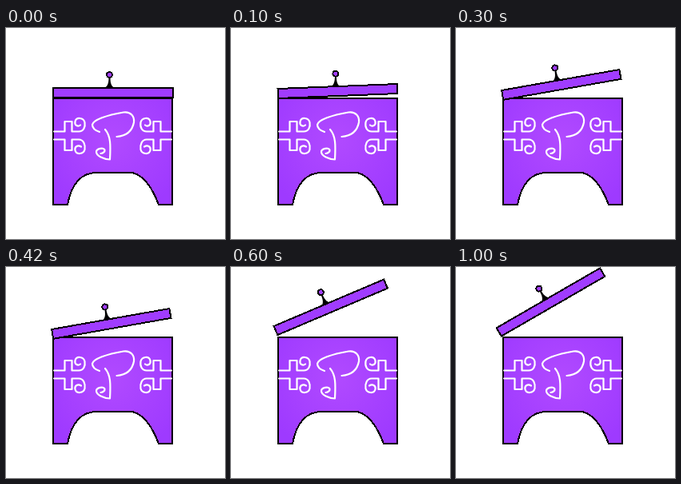
These frames come from a looping animation (274 by 264 pixels, 1200 ms). An HTML page:

```html
<!DOCTYPE html>
<html lang="en">
<head>
<meta charset="utf-8">
<title>Opening chest</title>
<style>
  html, body { margin: 0; width: 100%; height: 100%; overflow: hidden; background: #fff; }
  svg { display: block; width: 274px; height: 264px; }
  .box { fill: #a03cff; stroke: #000; stroke-width: 2; shape-rendering: crispEdges; }
  .trim { fill: none; stroke: #fff; stroke-width: 2.2; stroke-linecap: round; stroke-linejoin: round; }
</style>
</head>
<body>
<svg viewBox="0 0 274 264">
  <defs>
    <radialGradient id="glow" gradientUnits="userSpaceOnUse" cx="133" cy="140" r="95">
      <stop offset="0" stop-color="#b14aff"/>
      <stop offset="1" stop-color="#9e3aff"/>
    </radialGradient>
    <g id="scroll">
      <path d="M60 129.500H73.500V117H82.500V129.500H91C97 129.500 99.500 124 98.500 118C97 112 88 111 86.500 117C85.500 122 90 124 93 121.500"/>
      <path d="M60 139.500H73.500V153H82.500V139.500H91C97 139.500 99.500 146 98.500 152C97 158 88 159 86.500 153C85.500 148 90 146 94 148.500"/>
    </g>
  </defs>
  <path class="box" style="fill:url(#glow)" d="M59 88H208V221H191C185 205 174 185 158 181H114C94 181 82 194 77 221H59Z"/>
  <g class="trim">
    <use href="#scroll"/>
    <use href="#scroll" transform="matrix(-1 0 0 1 267 0)"/>
    <path d="M117 130C111 128 108 125 108 121C109 115 126 109 147 105.500C156 104 161 111 160 118C158 129 150 135 138.500 136"/>
    <path d="M124 127C131 135 131 146 130 164.500C122 164 113 160 113 155C113 151 122 149 123.500 152.500C124 155 121 157 118.500 157"/>
  </g>
  <g id="lid">
    <rect class="box" y="-12.500" width="149.500" height="12"/>
    <g id="knob">
      <path d="M-1-12C-1-6-2-2-5 0H5C2-2 1-6 1-12Z"/>
      <circle class="box" cy="-15.500" r="3.500"/>
    </g>
  </g>
</svg>
<script>
  const LOOP = 1200;
  // Each pose is held until the next one starts.
  const poses = [
    { at: 0,   x: 59,   y: 87,   angle: 0 },
    { at: 100, x: 59,   y: 88.5, angle: 2.3, slide: 2, tilt: 2.3 },
    { at: 200, x: 59,   y: 87.3, angle: 4.6, slide: 1.5, tilt: 4 },
    { at: 300, x: 59.3, y: 90.3, angle: 10 },
    { at: 500, x: 59,   y: 86,   angle: 16.2 },
    { at: 600, x: 58.5, y: 85.5, angle: 23 },
    { at: 700, x: 57,   y: 87,   angle: 30 }
  ];
  const lid = document.getElementById("lid");
  const knob = document.getElementById("knob");

  function draw(now) {
    const time = now % LOOP;
    const { x, y, angle, slide = 0, tilt = 0 } = poses.findLast(pose => pose.at <= time);
    lid.setAttribute("transform", `translate(${x} ${y}) rotate(${-angle})`);
    knob.setAttribute("transform", `translate(${70.5 + slide} -13) rotate(${tilt})`);
  }

  const start = performance.now();
  function tick() {
    draw(performance.now() - start);
    requestAnimationFrame(tick);
  }
  tick();
</script>
</body>
</html>
```
